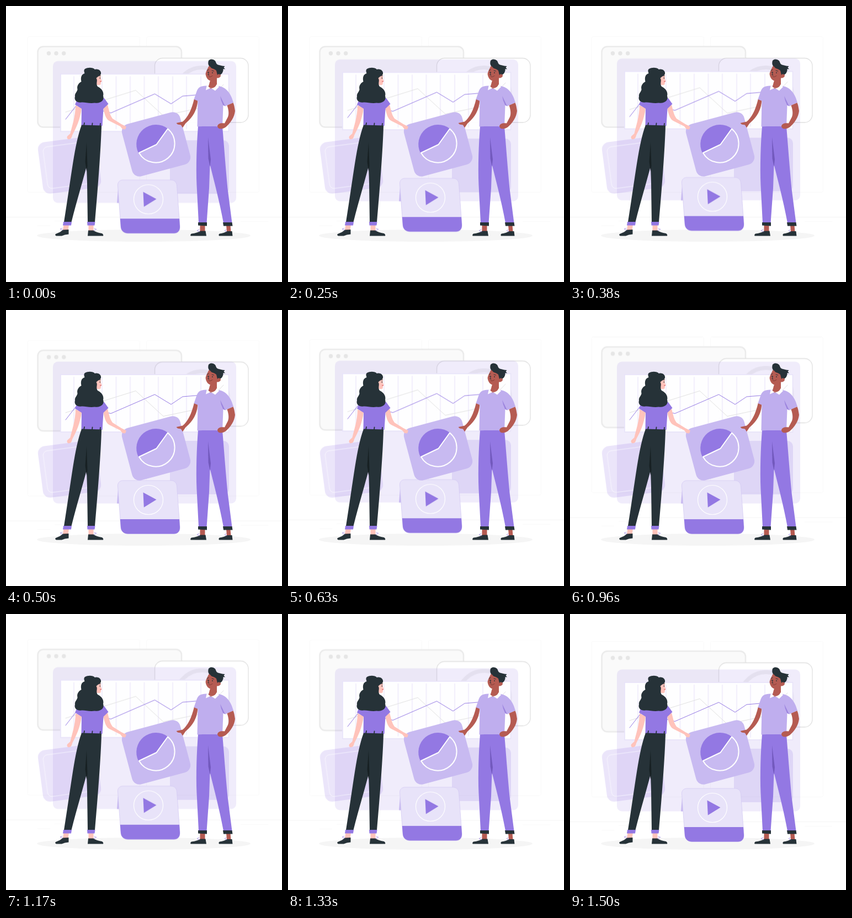
Animation of 500x500 px, one loop 1.54 s. Source, as an HTML page:

```html
<!DOCTYPE html>
<html lang="en">
<head>
<meta charset="utf-8">
<title>Floating dashboard</title>
<style>
  html, body { margin: 0; width: 100%; height: 100%; overflow: hidden; background: #fff; }
  svg { display: block; width: 100vw; height: 100vh; }
  .back { animation: drift 1540ms linear infinite; }
  .board { animation: hover 1540ms linear infinite; }

  @keyframes hover {
    0% { transform: translateY(-.54px); }
    47.3% { transform: translateY(-10px); }
    97.3%, 100% { transform: translateY(0); }
  }
  /* Starts late and snaps back when the loop restarts. */
  @keyframes drift {
    0%, 30.2% { transform: translateY(0); }
    78.9% { transform: translateY(-10px); }
    97.3%, 100% { transform: translateY(-6.2px); }
  }

  .violet { fill: #9378e3; }
  .lilac { fill: #c8baf1; }
  .dark { fill: #263238; }
  .fair { fill: #ffc3bb; }
  .brown { fill: #b55b52; }
  .line { fill: none; stroke-linecap: round; stroke-linejoin: round; }
</style>
</head>
<body>
<svg viewBox="0 0 500 500">
  <g class="back">
    <g fill="none" stroke="#f9f9f9">
      <rect x="39" y="55.5" width="203.5" height="282" rx="3"/>
      <rect x="254.5" y="55.5" width="204" height="282" rx="3"/>
      <path stroke="#f4f4f4" d="M0 382.5H500"/>
      <path d="M57 398H80M88 389.5H101M425 390.5H475"/>
    </g>
    <rect x="57.5" y="73.5" width="260.5" height="146" rx="10" fill="#fafafa" stroke="#ebebeb" stroke-width="2.5"/>
    <g fill="#e6e6e6">
      <circle cx="77.5" cy="85.8" r="3.7"/>
      <circle cx="91" cy="85.8" r="3.7"/>
      <circle cx="104.7" cy="85.8" r="3.7"/>
    </g>
    <rect x="269.5" y="94.5" width="169.5" height="116.5" rx="14" fill="#fff" stroke="#e0e0e0" stroke-width="1.3"/>
    <circle cx="355" cy="158.5" r="47" fill="none" stroke="#f2f2f2" stroke-width="7"/>
  </g>

  <ellipse cx="249.5" cy="416" rx="193.5" ry="11" fill="#f5f5f5"/>

  <g class="board">
    <rect class="violet" x="85" y="100.5" width="332" height="257" rx="9" opacity=".138"/>
    <rect x="99" y="124" width="304.5" height="104" fill="#fff" fill-opacity=".95" stroke="#e8e3f9" stroke-width="1.6"/>
    <path class="line" stroke="#f3f0fc" stroke-width="2.3"
      d="M123 129V223M148.5 129V223M174 129V223M199.5 129V223M225 129V223M250.5 129V223M276 129V223M302 129V223M327 129V223M353 129V223M378 129V223"/>
    <path class="line" stroke="#e0e0e0" d="M108 193L235 153.5 285 199.5 354 185 394 143"/>
    <path class="line" stroke="#9378e3" d="M108 206L129 179 190 194.5 269.5 160 299 178 320 164 350 161.5 394 170"/>
    <rect class="violet" x="297" y="244" width="107" height="97" rx="10" opacity=".185"/>
  </g>

  <g transform="translate(115 288) rotate(-7.5)">
    <rect class="violet" x="-53" y="-47" width="106" height="94" rx="13" opacity=".19"/>
    <rect x="-44" y="-38" width="88" height="76" rx="8" fill="none" stroke="#fff" stroke-opacity=".65"/>
  </g>

  <g class="board">
    <path class="lilac" d="M204 320L201 357.5H207Z"/>
    <path d="M212 316H299C305 316 309 320 309.5 326L315 400C315.5 408 311 412.5 304 412.5H221C214 412.5 208.5 408 208 401L202.5 326C202 320 206 316 212 316Z"
      fill="#e8e3f9" stroke="#d2c8f2" stroke-width=".7"/>
    <path class="violet" d="M206.8 386H314L315 400C315.5 408 311 412.5 304 412.5H221C214 412.5 208.5 408 208 401Z"/>
    <circle cx="258" cy="351" r="26.5" fill="none" stroke="#fff" stroke-width="1.2"/>
    <path class="violet" d="M248.5 337.5L272.5 350.5 249.8 364.5Z"/>
  </g>

  <rect class="lilac" x="-54.5" y="-49" width="109" height="98" rx="14" transform="translate(272 250.5) rotate(-15)"/>
  <path class="violet" d="M272 251L293.5 222.5A35.5 35.5 0 0 0 240 266.5Z"/>
  <path class="line" stroke="#fff" stroke-width="2" d="M272.5 251L293 222.5A34.5 34.5 0 1 1 241 266Z"/>

  <g id="woman">
    <path class="fair" d="M126 180C126 200 119 219 116.5 231L111 236Q109.5 240 113 241.5 119 241.5 120 234C127 221 134 207 137 185Z"/>
    <path class="fair" d="M176 184C179 199 182 206 188 208.5L207 218 211 223 216 223.5 218 218.5 209 214 193 204C188 197 187 190 184 179Z"/>
    <path class="violet" d="M130 167H178L185.5 177.5 176.5 186 174.5 217H136.5L137 186 125 178.5Z"/>
    <path class="fair" d="M104.5 396H114L112.5 407 103 406ZM149.5 396H158.5V408H149.5Z"/>
    <path class="dark" d="M137 215.5L173 216.5C172 258 166 335 161 391.5H148L147 320 146 290C139 318 129 350 118.5 391.5H105C119 305 124 250 137 215.5Z"/>
    <path fill="#172023" d="M146 247L147.5 290 146 300 143.5 282Z"/>
    <path class="violet" d="M104 391H119L118 397.5H103ZM147 391H161.5L160.5 397.5H147.5Z"/>
    <path class="dark" d="M113.5 405V413.5Q106 414 101 416.5H91Q88 415 90 413L98 409.5 103 405.5ZM149 406.5H158.5Q163 410 174 412 177 414 176 416.5H148Z"/>
    <path class="line" stroke="#a991e8" stroke-width=".8" d="M103 406L98 404 102 402.5M159 407L164 404.5 160 403"/>
    <path class="line" stroke="#263238" stroke-width="1.8" d="M142 212L141 217M156.5 212.5L156 217M171 213L170.5 217"/>
    <path class="fair" d="M163 130L171.5 124.5 172 132 173.5 136 172 138 171.5 142Q169 144.5 163 142Z"/>
    <path class="dark" d="M143 114C149 110.500 158 111.500 161 115C168 113 173 118 172 123C171 127 166 127 163.500 131C167 135 162 140 166 146C173 149 178 156 176 163C179 170 172 177 161 175.500C151 177 143 174 137 174.500C128 176 123 170 125 164C124 158 129 156 129.500 151C128 145 131 140 136.500 137C135 130 136 124 142.500 122C141 118 141 115.500 143 114Z"/>
    <circle class="dark" cx="170.3" cy="130.5" r=".9"/>
    <path class="line" stroke="#d65f64" stroke-width="1.2" d="M170.5 137L172.500 136.500"/>
    <path class="line" stroke="#263238" stroke-width=".8" d="M169 127L171.500 126.500"/>
  </g>

  <g id="man">
    <path class="brown" d="M341 168C336 189 329 202 320 209.5L308.5 212 311 214.5 317 215.5 320 220.5 325 213C335 204 346 193 347.5 170Z"/>
    <path class="brown" d="M351.5 397H360.5V409H351.5ZM399 397H406.5L407.5 409H400Z"/>
    <path class="violet" d="M348 217.5H392C395 255 399 305 402 335L409.5 393H394C386 350 376 314 369.5 287L368 330 363.5 393H349L345.5 325C344 290 345.5 250 348 217.5Z"/>
    <path fill="#7259bd" d="M366 238L371 278 369.5 291 366.5 276Z"/>
    <path class="dark" d="M348 392H364V398.5L348 397.5ZM393 392H409.5L410.5 398.5H394ZM352 407.5H361.5L363 416.5H334.5Q333.5 414 336 412.5 347 411 352 407.5ZM400 408H409.5L410.5 416.5H386Q384.5 414 387 412.5 396 411 400 408Z"/>
    <path class="line" stroke="#a991e8" stroke-width=".8" d="M351 409L346 407 350 404.5M400 409L396 407 399 405"/>
    <path fill="#bfaeee" d="M363 144.5C352 145 348 147 345 156L340.5 169 347.5 172 346.5 218.5Q370 217 392 219L393.5 180 397 181.5 412 175C408 160 400 147 385 145Z"/>
    <path fill="#9c84de" d="M388 163Q392 171 397 181.5L393 179Q389 171 388 163Z"/>
    <path class="brown" d="M400.5 180C404 190 404 196 402 201L396 212.5C389 211.5 383.5 213 383 218C384 224 392 223.500 398 219.500C407 212 414 201 415 190C414 183 413 178 411.500 175.200Z"/>
    <path class="brown" d="M371 131L382 128 382 146Q377 151 366 149Z"/>
    <path fill="#fff" d="M364 143L362 152.5 371 148.5 379 153.5 386 146.5 381.5 142Q379 149 371 149Q367 147 364 143Z"/>
    <path class="brown" d="M368 108C365 114 362 119 361.5 123C362.5 131 367 136 373 135.5C377 135.5 380 134 382 130.5C385 131 389 129 389 126C389 123 386 122 383 122.5L383 114Z"/>
    <path class="dark" d="M366.5 101C367 96 374 95 378 98.500C381 101 380 105 384 106.500L392 108.500 396.500 109 394.500 111.500 397 114.500 393.500 114C394 119 391 124 388 124.500Q385 122 383 125L381 117C377 113 372 114 370 110C366 108 366 104 366.500 101Z"/>
    <g class="line" stroke="#263238" stroke-width=".9">
      <path d="M364.500 116.500L367 115.500M373 117L376.500 118M367.500 120L366 125H368"/>
      <path stroke="#7b3934" d="M367 128Q371 129.500 374 126.500"/>
    </g>
    <circle class="dark" cx="366" cy="120" r=".9"/>
    <circle class="dark" cx="374" cy="121" r=".9"/>
  </g>
</svg>
</body>
</html>
```
